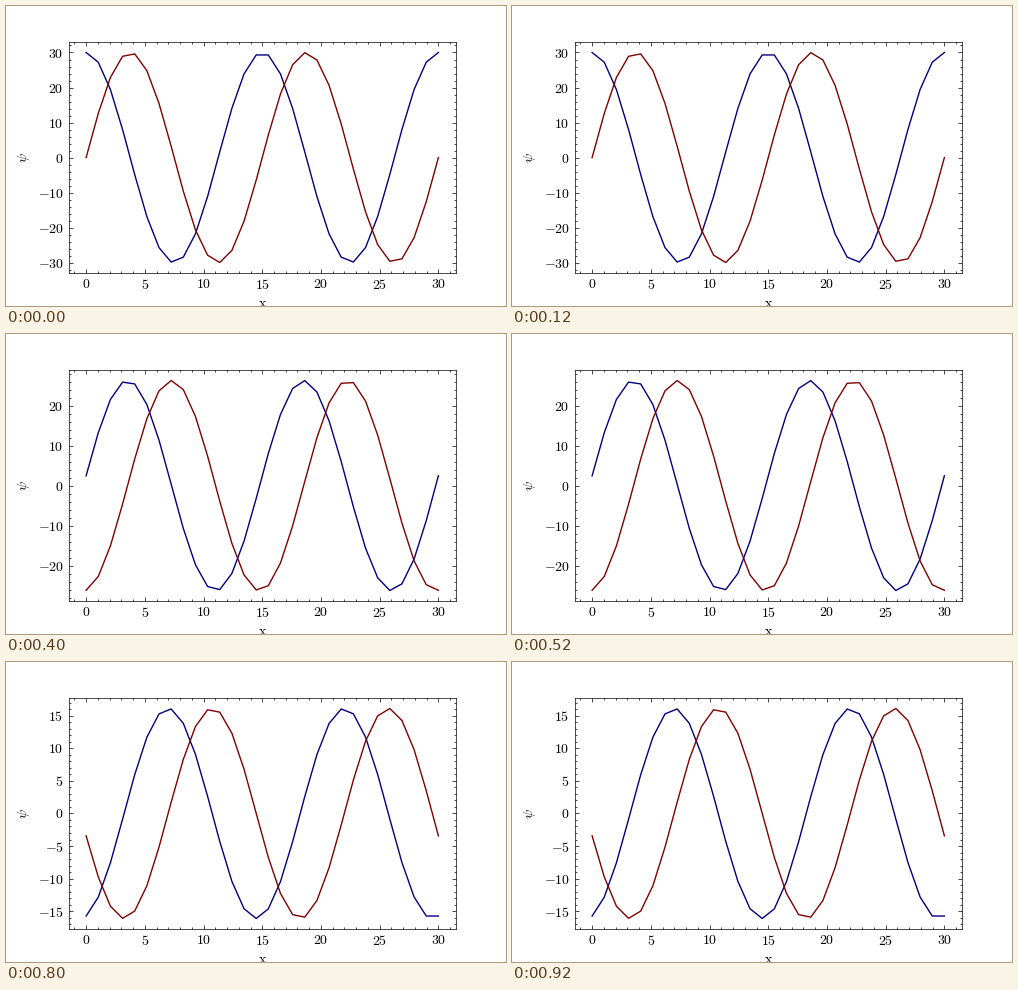
These frames come from a looping animation (500x300 px, 1000 ms). A matplotlib script:

```python
import matplotlib.pyplot as plt
import numpy as np
from matplotlib.animation import FuncAnimation
from matplotlib.ticker import AutoMinorLocator

FRAMES, INTERVAL = 5, 200

plt.rcParams.update({
    "font.family": "Liberation Serif",
    "mathtext.fontset": "cm",
    "font.size": 10,
    "axes.linewidth": 0.5,
    "lines.linewidth": 1,
})
for axis in ("xtick", "ytick"):
    plt.rcParams.update({
        f"{axis}.direction": "in",
        f"{axis}.major.size": 3,
        f"{axis}.major.width": 0.5,
        f"{axis}.minor.size": 1.5,
        f"{axis}.minor.width": 0.5,
        f"{axis}.minor.visible": True,
    })
plt.rcParams.update({"xtick.top": True, "ytick.right": True})

x = np.linspace(0, 30, 30)
k = 2 * np.pi * 2 / 30


def wave(step):
    """Two plane waves of equal wavelength beating in time."""
    mean, half_gap, imbalance = 0.7545, 0.2517, 0.058
    slow = 15 * (1 + imbalance) * np.exp(-1j * (mean - half_gap) * step)
    fast = 15 * (1 - imbalance) * np.exp(-1j * (mean + half_gap) * step)
    return (slow + fast) * np.exp(1j * k * x)


fig, ax = plt.subplots(figsize=(5, 3), dpi=100)
real_line, = ax.plot(x, wave(0).real, color="navy")
imag_line, = ax.plot(x, wave(0).imag, color="maroon")
ax.set_xlabel(r"$\mathrm{x}$")
ax.set_ylabel(r"$\psi$")
for axis in (ax.xaxis, ax.yaxis):
    axis.set_major_formatter(lambda value, pos: f"${value:.0f}$")
    axis.set_minor_locator(AutoMinorLocator(5))


def update(step):
    psi = wave(step)
    real_line.set_ydata(psi.real)
    imag_line.set_ydata(psi.imag)
    ax.relim()
    ax.autoscale_view()
    return real_line, imag_line


anim = FuncAnimation(fig, update, frames=FRAMES, interval=INTERVAL,
                     repeat=True, repeat_delay=0)
plt.show()
```
